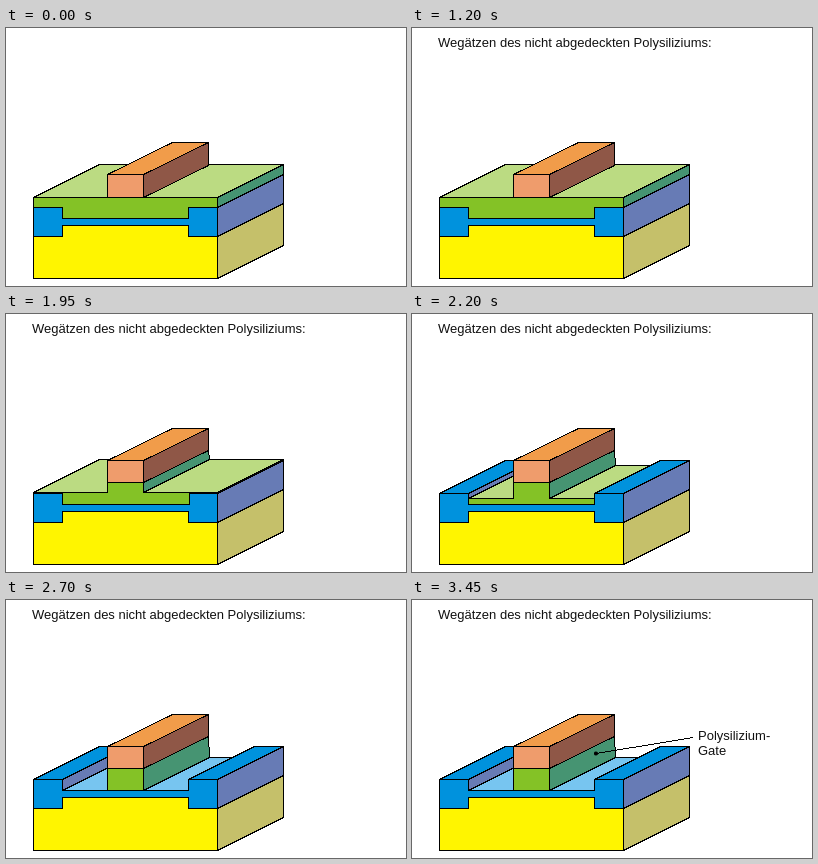
Animation, 400 px wide and 258 px high, one loop 5450 ms. Source, as an HTML page:

```html
<!DOCTYPE html>
<html lang="de">
<head>
<meta charset="utf-8">
<title>Polysilizium-Gate</title>
<style>
  html, body { margin: 0; width: 100%; height: 100%; overflow: hidden; background: #fff; }
  svg { display: block; width: 400px; height: 258px; }
  polygon { stroke: #000; stroke-width: 1; stroke-linejoin: round; }
  text { font: 13px "Liberation Sans", Arial, sans-serif; fill: #111; }
</style>
</head>
<body>
<svg viewBox="0 0 400 258">
  <clipPath id="titleClip"><rect id="titleRect" x="20" y="0" width="300" height="0"/></clipPath>
  <clipPath id="labelClip"><rect id="labelRect" x="182" y="125" width="0" height="40"/></clipPath>
  <g id="block" transform="translate(.5 .5)" shape-rendering="crispEdges"></g>
  <text x="26" y="19" clip-path="url(#titleClip)">Wegätzen des nicht abgedeckten Polysiliziums:</text>
  <g clip-path="url(#labelClip)">
    <circle cx="184" cy="153.5" r="2.1"/>
    <path d="M184 153.5L281.5 137.5" stroke="#000" shape-rendering="crispEdges"/>
    <text x="286" y="140">Polysilizium-</text>
    <text x="286" y="155">Gate</text>
  </g>
</svg>
<script>
const LOOP = 5450;
const COLOR = {
  yellow: '#fff500', khaki: '#c5c06a', blue: '#0092dd', purple: '#677bb5', sky: '#77c5f0',
  green: '#84c226', lime: '#bbdb82', teal: '#469472',
  resist: '#ef9c6c', resistTop: '#f19c4a', resistSide: '#8f5747'
};

// Etch depth over time: polysilicon level, resist bottom, right trench wall, floor colour
const ETCH = [
  { at: 0,    level: 169, base: 169, wall: 182, floor: 'lime' },
  { at: 1700, level: 172, base: 168, wall: 183, floor: 'lime' },
  { at: 1950, level: 178, base: 168, wall: 183, floor: 'lime' },
  { at: 2200, level: 184, base: 168, wall: 182, floor: 'lime' },
  { at: 2450, level: 190, base: 168, wall: 182, floor: 'lime' },
  { at: 2700, level: 190, base: 168, wall: 182, floor: 'sky' }
];

// Body outline
const X0 = 27, X1 = 211, TRENCH = 56, STEP = 182;
const OXIDE = 179, THIN = 190, SILICON = 197, FIELD = 208, BOTTOM = 250;
const GATE0 = 101, GATE1 = 137, RESIST = 146;
const BODY = [66, -33], BAR = [65, -32];

const $ = id => document.getElementById(id);
const poly = (color, ...pts) => `<polygon fill="${COLOR[color]}" points="${pts.join(' ')}"/>`;
const shift = ([x, y], [dx, dy]) => [x + dx, y + dy];

// Face swept from the edge a-b along the depth vector
const sweep = (color, a, b, depth = BODY) => poly(color, a, shift(a, depth), shift(b, depth), b);

function drawBlock({ level, base, wall, floor }) {
  const buried = level < OXIDE;
  const left = buried ? X0 : TRENCH;
  const right = buried ? X1 : STEP;
  const parts = [
    sweep('khaki', [X1, FIELD], [X1, BOTTOM]),
    sweep('purple', [X1, OXIDE], [X1, FIELD]),
    sweep(floor, [left, level], [right, level])
  ];
  if (buried) {
    parts.push(sweep('teal', [X1, level], [X1, OXIDE]));
  } else {
    parts.push(
      sweep('purple', [TRENCH, OXIDE], [TRENCH, level]),
      sweep('blue', [X0, OXIDE], [TRENCH, OXIDE]),
      sweep('blue', [STEP, OXIDE], [X1, OXIDE]));
  }
  if (level > base) {
    parts.push(poly('teal', [GATE1, base], shift([GATE1, base], BAR),
      shift([GATE1, level], BODY), [GATE1, level]));
  }

  const shoulderR = buried ? [[X1, level], [X1, OXIDE], [wall, OXIDE]] : [[wall, level]];
  const shoulderL = buried ? [[TRENCH, OXIDE], [X0, OXIDE], [X0, level]] : [[TRENCH, level]];
  parts.push(
    poly('green', [GATE0, level], [GATE0, base], [GATE1, base], [GATE1, level],
      ...shoulderR, [wall, THIN], [TRENCH, THIN], ...shoulderL),
    poly('blue', [X0, OXIDE], [TRENCH, OXIDE], [TRENCH, THIN], [wall, THIN], [wall, OXIDE],
      [X1, OXIDE], [X1, FIELD], [STEP, FIELD], [STEP, SILICON], [TRENCH, SILICON],
      [TRENCH, FIELD], [X0, FIELD]),
    poly('yellow', [X0, FIELD], [TRENCH, FIELD], [TRENCH, SILICON], [STEP, SILICON],
      [STEP, FIELD], [X1, FIELD], [X1, BOTTOM], [X0, BOTTOM]),
    sweep('resistSide', [GATE1, RESIST], [GATE1, base], BAR),
    sweep('resistTop', [GATE0, RESIST], [GATE1, RESIST], BAR),
    poly('resist', [GATE0, RESIST], [GATE1, RESIST], [GATE1, base], [GATE0, base]));
  $('block').innerHTML = parts.join('');
}

// Share of a wipe that is open: one step every 100 ms
const wipe = (t, start, steps) =>
  t < start ? 0 : Math.min(steps, Math.floor((t - start) / 100) + 1) / steps;

let shown;
function render(t) {
  const state = ETCH.findLast(s => t >= s.at);
  if (state !== shown) drawBlock(shown = state);
  const title = wipe(t, 1000, 3);
  $('titleRect').setAttribute('height', title && Math.round(9 + 13 * title));
  $('labelRect').setAttribute('width', Math.round(177 * wipe(t, 2950, 6)));
}

const start = performance.now();
function tick() {
  render((performance.now() - start) % LOOP);
  requestAnimationFrame(tick);
}
tick();
</script>
</body>
</html>
```
